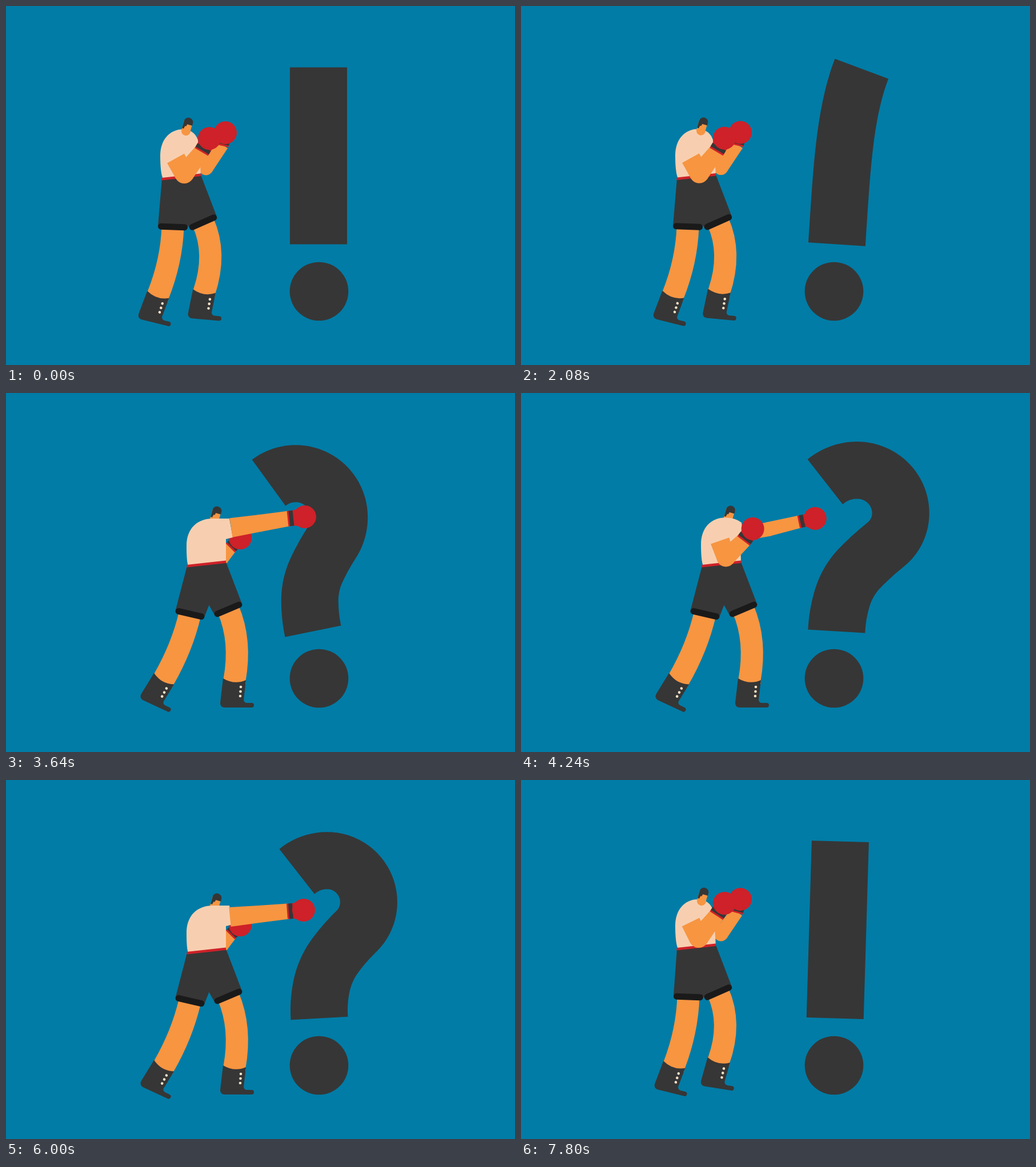
An HTML page with a canvas that plays this animation: 891 by 629 pixels, repeating every 7840 ms.

```html
<!DOCTYPE html>
<html lang="en">
<head>
<meta charset="utf-8">
<title>Boxer</title>
<style>
html, body { margin: 0; width: 100%; height: 100%; overflow: hidden; background: #007ca6; }
canvas { display: block; }
</style>
</head>
<body>
<canvas id="stage" width="891" height="629"></canvas>
<script>
const ctx = document.getElementById('stage').getContext('2d');
const LOOP = 7840, STEP = 40, RAD = Math.PI / 180;
const BLUE = '#007ca6', DARK = '#363636', BLACK = '#1a1a1a', SKIN = '#f79541',
  SHIRT = '#f7cfb0', RED = '#ce2129', CREAM = '#f9e3c8';

// ---- Mark: [base x, length, eight headings from base to tip] ----
const lean = (a, b, len = 312) =>
  [547 + 1.6 * a, len, ...Array.from({ length: 8 }, (_, i) => a + b * (i / 7) ** 3)];
const REST = lean(0, 0, 310);
const WAVE = [539, 310, -10, -5, 0, 1, -1, -10, -20, -14];
const CURL = [537.5, 382, -12, 0, 25, 33, -5, -46, -87, -128];
const HOOK = [548.5, 401, -4, 12, 36, 46, 0, -45, -90, -130];
const PEAK = [553, 430, 4, 18, 46, 52, 2, -45, -90, -130];
const hit = (t, hook = t + 50) =>
  [[t, CURL], [hook, HOOK], [t + 140, PEAK], [t + 245, HOOK]];

const markTrack = [
  [0, REST], [380, lean(-2, -2)], ...hit(460),
  [840, lean(2, 8, 320)], [1000, lean(-5, -11)], [1240, lean(-10, -21)],
  [1500, lean(-5, -9)], [1730, REST], [2000, lean(4, 19)], [2350, REST],
  [2650, lean(-6, -10)], [2880, WAVE], [2960, lean(-9, -6)], ...hit(3040),
  [3400, lean(-1, -2)], [3550, lean(-12, -16)], ...hit(3640),
  [4000, lean(-4, -2)], [4050, lean(-9, -8)], ...hit(4130),
  [4510, lean(2, 8, 320)], [4660, lean(-4, -8)], [4840, lean(-7.5, -16)],
  [4920, lean(-7, -15)], [5150, lean(-4, -8)], [5380, REST], [5600, lean(3, 8)],
  [5840, lean(-3, -3)], ...hit(5920, 6000),
  [6340, lean(1, 2, 318)], [6440, lean(-3, -6)], [6720, lean(-8, -19)],
  [7000, lean(-4, -7)], [7220, REST], [7500, lean(4, 6)], [7800, lean(1.7, 0, 310)], [LOOP, REST]
];

// ---- Legs: [hip x, y, back hem dx, back hem angle, front hem angle,
//             back boot x, y, angle, front boot x, y, angle] ----
const BACK = [273, 303, 19, 2, -24, 266, 507, 14, 347, 501, 5];
const HOP = [273, 296, 20, 2, -24, 268, 500, 14, 346, 492, 9];
const FRONT = [311, 303, 7, 11, -22, 274, 503, 22, 393, 502, 1];
const REACH = [317, 303, 5, 13, -23, 276, 502, 25, 400, 503, 0];
const CLOSE = [272, 303, 23, 0, -16, 274, 508, 11, 329, 498, 10];

const legTrack = [
  [0, BACK], [120, BACK], [330, FRONT], [440, REACH], [620, REACH], [860, CLOSE],
  [1000, BACK], [1280, BACK], [1500, HOP], [1640, BACK], [1900, HOP], [2040, BACK],
  [2300, HOP], [2440, BACK], [2600, BACK], [2800, FRONT], [2880, FRONT], [3000, REACH],
  [4300, REACH], [4560, FRONT], [4800, CLOSE], [4920, CLOSE], [5080, BACK],
  [5300, HOP], [5440, BACK], [5640, BACK], [5820, FRONT], [5910, REACH], [6120, REACH],
  [6340, FRONT], [6540, CLOSE], [6700, BACK], [6960, HOP], [7100, BACK],
  [7380, HOP], [7520, BACK], [7640, BACK], [7800, HOP], [LOOP, BACK]
];

// ---- Upper body, relative to the hip: [reach, neck, near shoulder, elbow,
//      wrist, glove, far elbow, wrist, glove] ----
const GUARD = [0, 42, -84, 24, -36, 39, -9, 70, -49, 83, -71, 77, -19, 106, -60, 111, -81];
const DODGE = [0, 35, -80, 27, -40, 43, -14, 69, -60, 80, -81, 62, -25, 103, -30, 127, -37];
const READY = [0, 42, -84, 24, -37, 36, -10, 70, -49, 86, -67, 71, -18, 109, -56, 124, -76];
const COVER = [0, 42, -84, 20, -44, 26, -15, 68, -47, 86, -62, 80, -25, 109, -64, 108, -90];
const LIFT = [0, 43, -84, 24, -47, 38, -19, 70, -60, 83, -80, 77, -26, 105, -65, 111, -87];
const NEAR = [1, 48, -81, 77, -67, 128, -75, 178, -83, 206, -86, 60, -13, 77, -33, 93, -49];
const NEAR_LOW = [1, 48, -81, 75, -63, 126, -68, 177, -73, 204, -75, 60, -13, 77, -33, 93, -49];
const FAR = [.6, 46, -82, 32, -45, 42, -15, 74, -45, 89, -65, 122, -70, 178, -80, 206, -84];
const punch = (t, arm, after = arm) =>
  [[t - 130, READY], [t - 20, arm], [t, arm], [t + 80, after], [t + 230, READY]];

const armTrack = [
  [0, GUARD], ...punch(460, NEAR, NEAR_LOW), [900, GUARD], [1140, DODGE], [1240, DODGE],
  [1440, GUARD], [1560, LIFT], [1680, GUARD], [1940, LIFT], [2080, GUARD], [2340, LIFT],
  [2500, GUARD], [2880, READY], ...punch(3040, FAR), ...punch(3640, NEAR, NEAR_LOW),
  ...punch(4130, FAR), [4760, COVER], [4920, COVER], [5120, GUARD], [5320, LIFT],
  [5480, GUARD], ...punch(5920, NEAR, NEAR_LOW), [6560, COVER], [6760, GUARD],
  [6980, LIFT], [7120, GUARD], [7400, LIFT], [7540, GUARD], [7800, LIFT], [LOOP, GUARD]
];

// Monotone cubic interpolation between neighbouring poses
function sample(track, t) {
  let i = 1;
  while (i < track.length - 1 && track[i][0] <= t) i++;
  const [k0, k1] = [track[i - 1], track[i]], span = k1[0] - k0[0];
  const u = (t - k0[0]) / span, u2 = u * u, u3 = u2 * u;
  const rate = (a, b, n) => a && b ? (b[1][n] - a[1][n]) / (b[0] - a[0]) : 0;
  const slope = (a, b) => a * b <= 0 ? 0 : 2 * a * b / (a + b);
  return k0[1].map((v, n) => {
    const d = rate(k0, k1, n), w = k1[1][n];
    const m0 = slope(rate(track[i - 2], k0, n), d) * span;
    const m1 = slope(d, rate(k1, track[i + 1], n)) * span;
    return v + (w - v) * (3 * u2 - 2 * u3) + m0 * (u3 - 2 * u2 + u) + m1 * (u3 - u2);
  });
}

function poly(color, points) {
  ctx.fillStyle = color;
  ctx.beginPath();
  points.forEach(p => ctx.lineTo(p[0], p[1]));
  ctx.fill();
}

function disc(color, x, y, r) {
  ctx.fillStyle = color;
  ctx.beginPath();
  ctx.arc(x, y, r, 0, 2 * Math.PI);
  ctx.fill();
}

function local(x, y, angle, draw) {
  ctx.save();
  ctx.translate(x, y);
  ctx.rotate(angle);
  draw();
  ctx.restore();
}

function limb(a, b, wa, wb) {
  const len = Math.hypot(b[0] - a[0], b[1] - a[1]);
  local(a[0], a[1], Math.atan2(b[1] - a[1], b[0] - a[0]), () =>
    poly(SKIN, [[0, -wa / 2], [len, -wb / 2], [len, wb / 2], [0, wa / 2]]));
}

function arm(shoulder, elbow, wrist, glove, ws, we, ww) {
  limb(shoulder, elbow, ws, we);
  disc(SKIN, ...elbow, we / 2);
  limb(elbow, wrist, we, ww);
  const dx = glove[0] - wrist[0], dy = glove[1] - wrist[1], len = Math.hypot(dx, dy);
  const h = ww / 2;
  local(wrist[0], wrist[1], Math.atan2(dy, dx), () => {
    poly(RED, [[-2, -h], [10, -h], [len - 2, -19], [len - 2, 19], [10, h], [-2, h]]);
    poly(DARK, [[1, -h], [8, -h], [8, h], [1, h]]);
    disc(RED, len, 0, 20);
  });
}

function drawMark([x, len, ...angles]) {
  const sub = 10, step = len / 7 / sub;
  let y = 417.5;
  ctx.beginPath();
  ctx.moveTo(x, y);
  for (let i = 0; i < 7; i++) {
    for (let j = 0; j < sub; j++) {
      const a = (angles[i] + (angles[i + 1] - angles[i]) * (j + .5) / sub) * RAD;
      x += step * Math.sin(a);
      y -= step * Math.cos(a);
      ctx.lineTo(x, y);
    }
  }
  ctx.strokeStyle = DARK;
  ctx.lineWidth = 100;
  ctx.lineCap = 'butt';
  ctx.lineJoin = 'round';
  ctx.stroke();
  disc(DARK, 548, 500, 51.3);
}

function drawLeg(hx, hy, hemAngle, x, y, bootAngle) {
  const a = hemAngle * RAD, b = bootAngle * RAD;
  ctx.strokeStyle = SKIN;
  ctx.lineWidth = 39;
  ctx.lineCap = 'butt';
  ctx.beginPath();
  ctx.moveTo(hx, hy);
  ctx.quadraticCurveTo(hx - 60 * Math.sin(a), hy + 60 * Math.cos(a), x, y);
  ctx.lineTo(x - 7 * Math.sin(b), y + 7 * Math.cos(b));
  ctx.stroke();
  local(x, y, b, () => {
    ctx.fillStyle = DARK;
    ctx.beginPath();
    ctx.moveTo(-20, -3);
    ctx.quadraticCurveTo(0, 9, 20, 0);
    ctx.lineTo(16, 35);
    ctx.quadraticCurveTo(17, 40, 22, 40);
    ctx.lineTo(30, 40);
    ctx.arc(30, 44, 4, -Math.PI / 2, Math.PI / 2);
    ctx.lineTo(-18, 48);
    ctx.quadraticCurveTo(-25, 47, -25, 40);
    ctx.fill();
    [[11, 12], [10.5, 20], [10, 28]].forEach(p => disc(CREAM, ...p, 2.3));
  });
}

function drawShorts(r, y, hems) {
  const ends = ([x, hy, a], half, up) => [-half, half].map(s =>
    [x + s * Math.cos(a * RAD) + up * Math.sin(a * RAD), hy + s * Math.sin(a * RAD) - up * Math.cos(a * RAD)]);
  const belt = [[r, y], [r + 68, y - 7]];
  for (const hem of hems) {
    const [left, right] = ends(hem, 26, 1);
    poly(DARK, [...belt, right, left]);
  }
  ctx.strokeStyle = BLACK;
  ctx.lineWidth = 11;
  ctx.lineCap = 'round';
  for (const hem of hems) {
    const [left, right] = ends(hem, 20.5, 0);
    ctx.beginPath();
    ctx.moveTo(...left);
    ctx.lineTo(...right);
    ctx.stroke();
  }
}

function drawHead(x, y) {
  local(x, y, 16 * RAD, () => {
    disc(SKIN, 0, 0, 8);
    ctx.fillRect(-8, -18, 15.5, 18);
    ctx.fillStyle = DARK;
    ctx.beginPath();
    ctx.arc(0, -16, 8, Math.PI, 0);
    ctx.lineTo(8, -12);
    ctx.lineTo(-1, -12);
    ctx.lineTo(-2, -8);
    ctx.lineTo(-4, -8);
    ctx.lineTo(-5, -3);
    ctx.lineTo(-8, -3);
    ctx.fill();
  });
}

function drawTorso(r, y, reach) {
  const p = (x0, y0, x1, y1) => [r + x0 + (x1 - x0) * reach, y + y0 + (y1 - y0) * reach];
  ctx.fillStyle = SHIRT;
  ctx.beginPath();
  ctx.moveTo(r + 2, y);
  ctx.quadraticCurveTo(...p(-3, -10, -1, -7), ...p(-3, -41, -1, -35));
  ctx.bezierCurveTo(...p(-3, -68, -1, -66), ...p(13, -87, 18, -83), ...p(37, -87, 45, -83));
  ctx.quadraticCurveTo(...p(57, -86, 60, -83), ...p(63, -68, 74, -83));
  ctx.lineTo(...p(65, -50, 80, -50));
  ctx.lineTo(...p(66, -40, 68, -47));
  ctx.lineTo(r + 68, y - 6);
  ctx.fill();
  poly(RED, [[r, y - 2], [r + 68, y - 9.5], [r + 68, y - 5], [r - 1, y + 2.5]]);
}

function drawBoxer(legs, upper) {
  const [r, y, hemX, backAngle, frontAngle, ...boots] = legs;
  const [reach, ...v] = upper;
  const at = i => [r + v[2 * i], y + v[2 * i + 1]];
  const hems = [[r + hemX, y + 84, backAngle], [r + 72, y + 76, frontAngle]];

  arm([r + 50, y - 52], at(5), at(6), at(7), 24, 25, 22);
  hems.forEach((h, i) => drawLeg(...h, ...boots.slice(3 * i, 3 * i + 3)));
  drawShorts(r, y, hems);
  if (reach > .5) drawHead(...at(0));
  drawTorso(r, y, reach);
  if (reach <= .5) drawHead(...at(0));
  arm(at(1), at(2), at(3), at(4), 34, 34 - 4 * reach, 27);
}

function frame() {
  const t = Math.floor(performance.now() % LOOP / STEP) * STEP;
  ctx.fillStyle = BLUE;
  ctx.fillRect(0, 0, 891, 629);
  drawMark(sample(markTrack, t));
  drawBoxer(sample(legTrack, t), sample(armTrack, t));
  requestAnimationFrame(frame);
}
frame();
</script>
</body>
</html>
```
